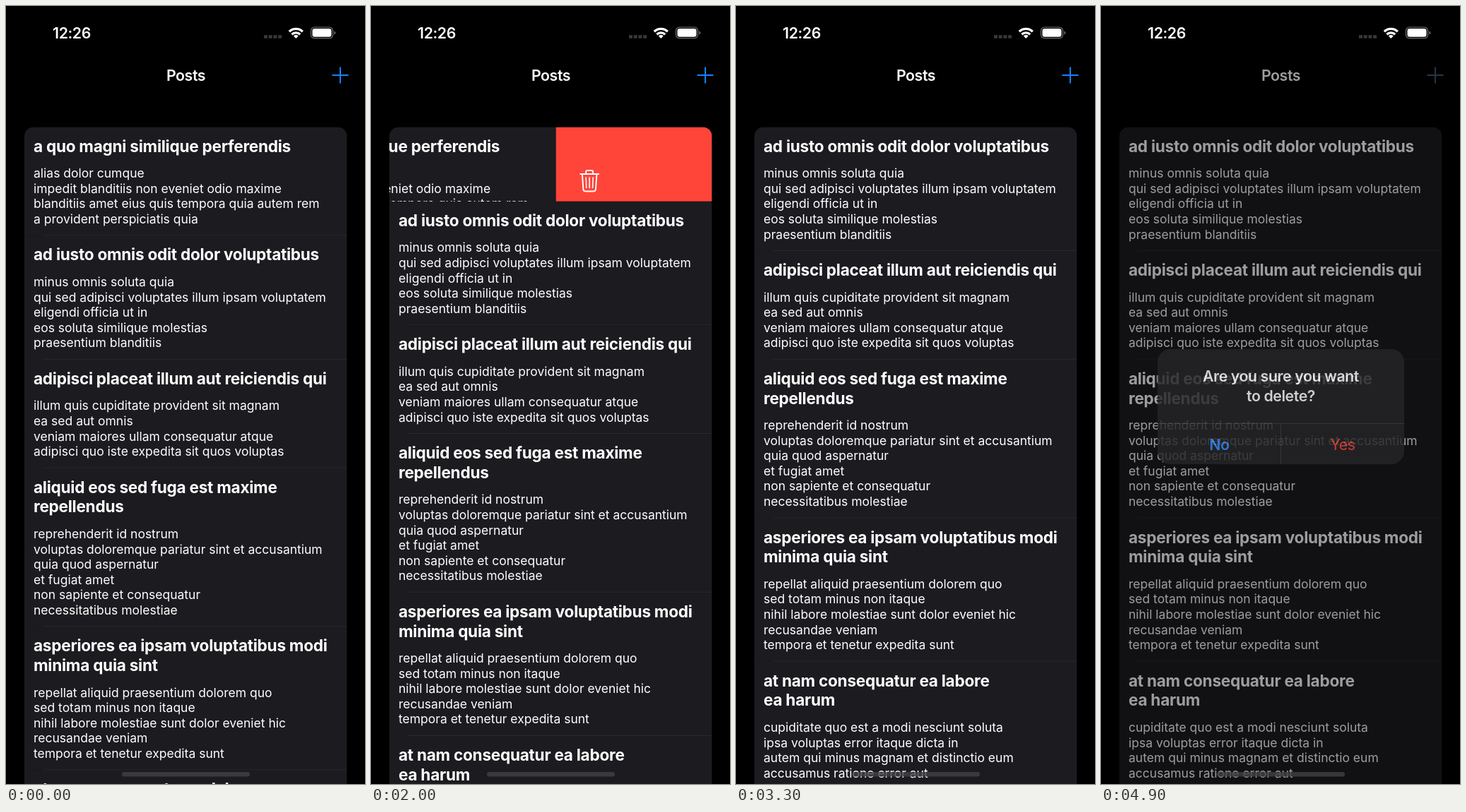
An HTML page for the animation above (5 s loop, 508 by 1102 pixels).

```html
<!DOCTYPE html>
<html lang="en">
<head>
<meta charset="utf-8">
<title>Posts</title>
<style>
  html, body { margin: 0; width: 100%; height: 100%; overflow: hidden; background: #000; }
  svg { display: block; width: 100%; height: 100%; font-family: Inter, sans-serif; font-optical-sizing: none; fill: #fff; }
  .title { font-size: 22.6px; font-weight: 650; letter-spacing: -.27px; }
  .body { font-size: 17.5px; }
  .bar { font-size: 21.3px; font-weight: 600; letter-spacing: -.42px; text-anchor: middle; }
  .plain { font-weight: 400; }
  .card { fill: #1c1b1f; }
  .line { fill: none; stroke: #2d2c30; }
  .red { fill: #ff453a; }
  .icon { fill: none; stroke: #fff; stroke-width: 1.9; stroke-linecap: round; stroke-linejoin: round; }
</style>
</head>
<body>
<svg viewBox="0 0 508 1102">
  <defs>
    <clipPath id="cardClip"><rect x="26" y="171.5" width="456.5" height="1000" rx="13"/></clipPath>
    <clipPath id="restClip"><rect id="restShape" x="26" y="0" width="456.5" height="1200"/></clipPath>
  </defs>

  <text class="bar" x="254.5" y="105.5">Posts</text>
  <path id="plus" d="M461.5 98h23M473 86.5v23" fill="none" stroke-width="2"/>

  <g id="firstRow" clip-path="url(#cardClip)">
    <g id="swiped">
      <g id="first" transform="translate(0 171.5)"></g>
    </g>
    <rect id="redRow" class="red" y="171.5"/>
    <g id="trash" class="icon">
      <path d="M-13 -10H13M-5 -10V-13Q-5 -15 -3 -15H3Q5 -15 5 -13V-10M-10.3 -10L-8.8 11.5Q-8.5 14.5 -5.8 14.5H5.8Q8.5 14.5 8.8 11.5L10.3 -10"/>
      <path d="M-5 -5L-4.4 9.5M0 -5V9.5M5 -5L4.4 9.5" stroke-width="1.6"/>
    </g>
  </g>
  <rect id="redLine" class="red" x="26" y="170.2" width="456.5" height="1.4"/>
  <g id="rest" clip-path="url(#restClip)"></g>

  <rect id="dim" width="508" height="1102" fill="#000"/>
  <g id="alert">
    <rect x="80" y="486" width="349" height="163" rx="18" fill="#252527"/>
    <path d="M80 591.5H429M254.5 591.5V649" fill="none" stroke="#414144"/>
    <text class="bar" x="254.5" y="532">Are you sure you want</text>
    <text class="bar" x="254.5" y="560">to delete?</text>
    <text class="bar" x="167.5" y="628.5" fill="#3a8fff">No</text>
    <text class="bar plain" x="342" y="628.5" fill="#ff453a">Yes</text>
  </g>

  <text class="bar" x="93" y="46">12:26</text>
  <path d="M365 43.5h5m1.7 0h5m1.7 0h5m1.7 0h5" stroke="#39393c" stroke-width="4.5"/>
  <g fill="none" stroke="#fff" stroke-width="3.3">
    <path d="M400.8 36.2a13.6 13.6 0 0 1 19 0M404.4 40.2a8.5 8.5 0 0 1 11.8 0"/>
    <path d="M410.3 46l-3.4 -3.5a4.8 4.8 0 0 1 6.8 0z" fill="#fff" stroke="none"/>
  </g>
  <rect x="431.5" y="30.1" width="31" height="15.6" rx="5" fill="none" stroke="#68686b" stroke-width="1.3"/>
  <rect x="433.5" y="32.1" width="27" height="11.6" rx="3.3"/>
  <path d="M464.3 35.4q2.2 .8 2.2 2.5t-2.2 2.5z" fill="#68686b"/>
  <rect x="164" y="1085" width="181" height="6.5" rx="3.25" fill="#414144" fill-opacity=".8"/>
</svg>

<script>
const posts = [
  ["a quo magni similique perferendis",
   "alias dolor cumque|impedit blanditiis non eveniet odio maxime|blanditiis amet eius quis tempora quia autem rem|a provident perspiciatis quia"],
  ["ad iusto omnis odit dolor voluptatibus",
   "minus omnis soluta quia|qui sed adipisci voluptates illum ipsam voluptatem|eligendi officia ut in|eos soluta similique molestias|praesentium blanditiis"],
  ["adipisci placeat illum aut reiciendis qui",
   "illum quis cupiditate provident sit magnam|ea sed aut omnis|veniam maiores ullam consequatur atque|adipisci quo iste expedita sit quos voluptas"],
  ["aliquid eos sed fuga est maxime|repellendus",
   "reprehenderit id nostrum|voluptas doloremque pariatur sint et accusantium|quia quod aspernatur|et fugiat amet|non sapiente et consequatur|necessitatibus molestiae"],
  ["asperiores ea ipsam voluptatibus modi|minima quia sint",
   "repellat aliquid praesentium dolorem quo|sed totam minus non itaque|nihil labore molestiae sunt dolor eveniet hic|recusandae veniam|tempora et tenetur expedita sunt"],
  ["at nam consequatur ea labore|ea harum",
   "cupiditate quo est a modi nesciunt soluta|ipsa voluptas error itaque dicta in|autem qui minus magnam et distinctio eum|accusamus ratione error aut"]
].map(post => post.map(text => text.split("|")));

const TOP = 171.5, RIGHT = 482.5, WIDTH = 456.5, OPEN = 95.5;
const TITLE_LINE = 27.7, BODY_LINE = 21.6;
const $ = id => document.getElementById(id);
const set = (id, attrs) => Object.entries(attrs).forEach(([k, v]) => $(id).setAttribute(k, v));
const rowHeight = ([title, body]) => 39.7 + TITLE_LINE * title.length + BODY_LINE * body.length;

function rowMarkup(post, y) {
  const [title, body] = post, height = rowHeight(post);
  const lines = (list, cls, start, step) =>
    list.map((s, i) => `<text class="${cls}" x="39" y="${start + i * step}">${s}</text>`).join("");
  return `<g transform="translate(0 ${y})">
    <rect class="card" x="26" width="${WIDTH}" height="${height + .5}"/>
    ${lines(title, "title", 35.2, TITLE_LINE)}
    ${lines(body, "body", 44 + TITLE_LINE * title.length, BODY_LINE)}
    <path class="line" d="M52 ${height - .3}H${RIGHT}"/></g>`;
}

const firstHeight = rowHeight(posts[0]);
$("first").innerHTML = rowMarkup(posts[0], 0);
let y = 0;
$("rest").innerHTML = posts.slice(1).map(post => {
  const markup = rowMarkup(post, y);
  y += rowHeight(post);
  return markup;
}).join("");

// Critically damped spring from 0 to 1
const spring = x => x <= 0 ? 0 : 1 - (1 + x) * Math.exp(-x);
const mix = (a, b, p) => a + (b - a) * p;

function swipeOffset(t) {
  if (t < 1000) return 0;
  return t < 1600 ? OPEN - 58.5 * Math.exp((1000 - t) / 120) : OPEN;
}

function alertOpacity(t) {
  if (t < 4100) return spring((t - 3600) * .014);
  return t < 4800 ? 1 : t < 4900 ? .97 : .8;
}

function draw(t) {
  const removed = t < 2000 ? 0 : t < 2600 ? spring((t - 1950) * .0228) : 1;
  const offset = mix(swipeOffset(t), WIDTH, Math.min(1, removed * 1.1));
  const remaining = firstHeight * (1 - removed);
  set("swiped", { transform: `translate(${-offset} 0)` });
  set("redRow", { x: RIGHT - offset, width: offset, height: remaining });
  set("trash", { transform: `translate(${530 - offset} 248)` });
  set("firstRow", { visibility: removed < 1 ? "visible" : "hidden" });
  set("redLine", { opacity: t < 2100 || t >= 2700 ? 0 : t < 2500 ? 1 : .5 });
  set("rest", { transform: `translate(0 ${TOP + remaining})` });
  set("restShape", { rx: 13 * removed });

  const shown = alertOpacity(t);
  const scale = t < 4100 ? mix(1.15, 1, shown) : 1;
  set("dim", { opacity: .48 * shown });
  set("alert", {
    opacity: shown,
    transform: `translate(254.5 567.5) scale(${scale}) translate(-254.5 -567.5)`
  });
  const tint = [[20, 75], [130, 75], [255, 78]].map(([a, b]) => Math.round(mix(a, b, shown)));
  set("plus", { stroke: `rgb(${tint})` });
}

// The picture advances ten times a second
const start = performance.now();
function tick() {
  const t = Math.max(0, performance.now() - start) % 5000;
  draw(Math.floor(t / 100) * 100);
  requestAnimationFrame(tick);
}
tick();
</script>
</body>
</html>
```
